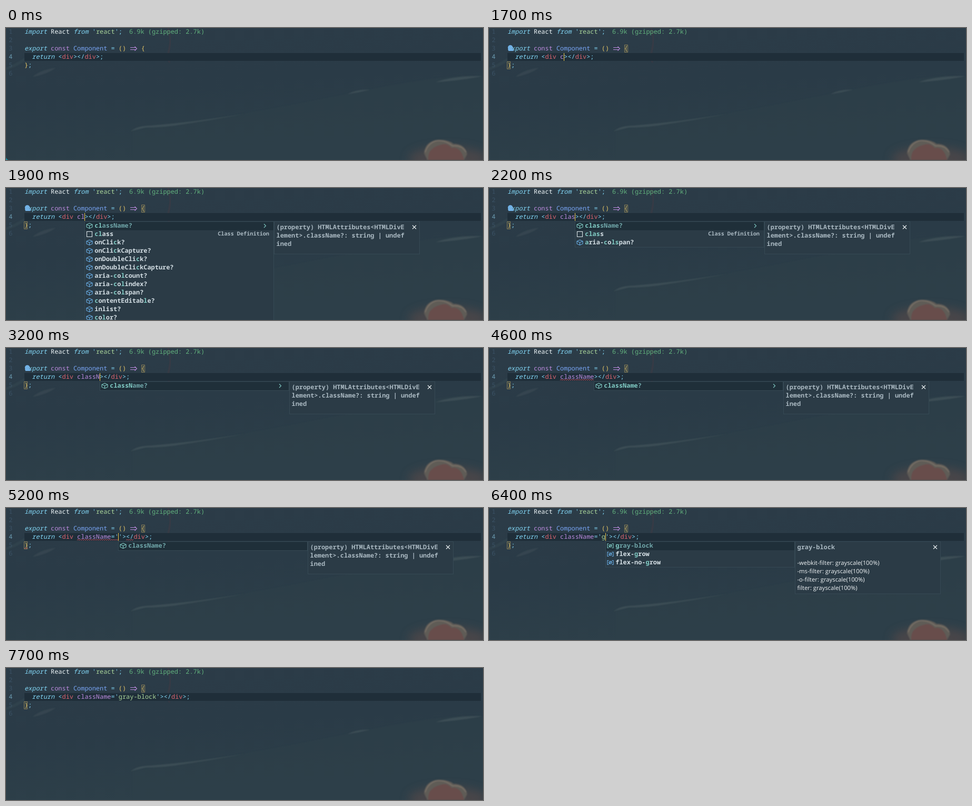
An HTML page that plays this animation: 906 by 253 pixels, repeating every 8 s.

```html
<!DOCTYPE html>
<html lang="en">
<head>
<meta charset="utf-8">
<title>Editor completion</title>
<style>
  html, body { margin: 0; width: 100%; height: 100%; overflow: hidden; background: #2b3c47; }
  svg { display: block; width: 906px; height: 253px; }
  text { font: 11.935px "Noto Sans Mono", "DejaVu Sans Mono", monospace; white-space: pre; text-rendering: geometricPrecision; }
  .key { fill: #82d6f5; font-style: italic; }
  .op { fill: #82d6f5; }
  .id { fill: #eef6f8; }
  .str { fill: #a9d49a; }
  .cost { fill: #62b17d; }
  .attr { fill: #bd8ce0; }
  .fn { fill: #78a5f5; }
  .br { fill: #e6c766; }
  .tag { fill: #dc6570; }
  .num { fill: #3b5265; }
  .now { fill: #6c9cb2; }
  .row { fill: #d3dee4; font-weight: 600; }
  .sel { fill: #6fa5a8; }
  .hit { fill: #80cbc4; font-weight: 700; }
  .info { fill: #a9b8c1; font-weight: 600; }
  .prose { font: 11.25px "Open Sans", "Noto Sans", sans-serif; fill: #f0f4f6; }
  .line { fill: none; stroke-width: 1.1; }
  .panel { fill: #2b3b46; stroke: #364954; }
  .box { fill: none; stroke: #8d8257; }
  .wave { fill: none; stroke: #c4515c; stroke-width: .9; }
</style>
</head>
<body>
<svg viewBox="0 0 906 253">
  <defs>
    <linearGradient id="sky" x1="0" y1="0" x2=".25" y2="1">
      <stop offset="0" stop-color="#2c3c48"/>
      <stop offset=".5" stop-color="#2a3b47"/>
      <stop offset="1" stop-color="#2d3f49"/>
    </linearGradient>
    <filter id="soft" x="-20%" y="-50%" width="140%" height="200%"><feGaussianBlur stdDeviation="1"/></filter>
    <filter id="haze" x="-40%" y="-60%" width="180%" height="220%"><feGaussianBlur stdDeviation="9"/></filter>
  </defs>
  <rect width="906" height="253" fill="url(#sky)"/>
  <path d="M240 197Q450 168 650 126T906 93V253H240Z" fill="#2f414a" opacity=".6" filter="url(#soft)"/>
  <g fill="#43535a" opacity=".75" filter="url(#soft)">
    <path d="M236 198Q250 187 275 187Q360 180 455 164Q400 175 340 184Q300 191 265 191Z"/>
    <path d="M648 127Q665 117 692 118Q670 124 648 127Z"/>
    <path d="M815 104Q850 91 906 92Q870 100 815 104Z"/>
    <path d="M50 94Q65 80 95 76Q80 88 50 94Z" opacity=".6"/>
    <path d="M0 76Q30 64 60 38Q45 66 0 81Z" opacity=".4"/>
  </g>
  <path d="M308 0Q315 22 310 40T311 66" fill="none" stroke="#4b3a43" stroke-width="2" opacity=".7" filter="url(#soft)"/>
  <ellipse cx="840" cy="250" rx="75" ry="22" fill="#54494a" opacity=".7" filter="url(#haze)"/>
  <g filter="url(#soft)">
    <path d="M794 240Q796 220 815 215Q838 212 850 222Q872 222 876 242L870 253H800Z" fill="#5f5b57"/>
    <path d="M802 253Q800 232 822 225Q838 218 846 230Q864 226 870 253Z" fill="#684e4c"/>
    <path d="M796 238Q802 220 818 216Q834 214 848 226Q866 224 874 238" fill="none" stroke="#787066" stroke-width="2"/>
  </g>
  <rect x="35" y="48" width="867" height="15" fill="#1f2e39"/>
  <g id="code"></g>
  <g id="live"></g>
</svg>
<script>
const LOOP = 8000, LEFT = 34.95, CELL = 7.161, TOP = 65, ROW = 16;
const colX = n => LEFT + CELL * n;
const cursorX = n => Math.floor(colX(n));
const esc = s => s.replace(/&/g, '&amp;').replace(/</g, '&lt;');
const span = (cls, s) => `<tspan class="${cls}">${esc(s)}</tspan>`;
const text = (x, y, body, cls = '') => `<text x="${x}" y="${y}" class="${cls}">${body}</text>`;
const codeLine = (n, ...parts) =>
  text(LEFT, ROW * n - 5, parts.map(([cls, s]) => span(cls, s)).join(''));

// Completion lists: [kind, label, query override]
const PROP = ['prop', 'className?'], SNIP = ['snip', 'class'];
const props = s => s.split(' ').map(label => ['prop', label]);
const enums = s => s.split(' ').map(label => ['enum', label]);
const lists = {
  many: [PROP, SNIP, ...props('onClick? onClickCapture? onDoubleClick? onDoubleClickCapture? aria-colcount? aria-colindex? aria-colspan? contentEditable? inlist? color?')],
  few: [PROP, SNIP, ['prop', 'aria-colspan?', 'acls']],
  exact: [SNIP, PROP],
  one: [PROP],
  classes: enums('absolute block bg-white border container fixed flex flex-grow flex-no-grow gray-block hidden inline'),
  grey: enums('gray-block flex-grow flex-no-grow')
};
const details = {
  prop: { h: 62, head: ['(property) HTMLAttributes<HTMLDivE', 'lement>.className?: string | undef', 'ined'] },
  snip: { h: 132, head: ['Class Definition', '', 'class name {', '  constructor(parameters) {', '', '  }', '}'] },
  pos: { h: 52, head: ['absolute'], prose: ['position: absolute'] },
  filter: { h: 100, head: ['gray-block'],
    prose: ['-webkit-filter', '-ms-filter', '-o-filter', 'filter'].map(p => p + ': grayscale(100%)') }
};

// Each step overrides part of the state before it
const steps = [
  [0, { attr: '', cursor: 0, match: 0, corner: 1, bulb: 0, list: '', detail: '', wave: 0 }],
  [800, { cursor: 1, match: 1 }],
  [900, { corner: 0 }],
  [1200, { attr: ' ' }],
  [1400, { bulb: 1 }],
  [1600, { attr: ' c' }],
  [1800, { attr: ' cl', list: 'many' }],
  [1900, { detail: 'prop' }],
  [2000, { attr: ' cla' }],
  [2200, { attr: ' clas', list: 'few' }],
  [2300, { attr: ' class' }],
  [2400, { list: 'exact' }],
  [2500, { detail: 'snip' }],
  [2900, { cursor: 0 }],
  [3200, { attr: ' classN', cursor: 1, list: 'one', detail: 'prop' }],
  [3500, { attr: ' classNa' }],
  [3600, { bulb: 0, wave: 1 }],
  [3900, { attr: ' classNam' }],
  [4100, { attr: ' className' }],
  [4600, { cursor: 0 }],
  [4800, { attr: " className=''", cursor: 1 }],
  [5200, { wave: 2 }],
  [5300, { list: '', detail: '', cursor: 0 }],
  [5400, { list: 'classes', detail: 'pos' }],
  [5700, { wave: 0 }],
  [5800, { cursor: 1 }],
  [6100, { cursor: 0 }],
  [6400, { attr: " className='g'", cursor: 1, list: 'grey', detail: 'filter' }],
  [6900, { cursor: 0 }],
  [7200, { attr: " className='gray-block'", cursor: 1, list: '', detail: '' }],
  [7700, { cursor: 0 }]
];

function icon(kind, x, y, color) {
  const d = {
    prop: 'M0-5L5.5-2.5V2.5L0 5L-5.5 2.5V-2.5ZM-5.5-2.5L0 0L5.5-2.5M0 0V5',
    snip: 'M-5-5H5V5H-5Z',
    enum: 'M-3-4H-5.5V4H-3M3-4H5.5V4H3M-2.5 2.5L2.5-2.5M-2.5 0A2.5 2.5 0 1 0 2.5 0A2.5 2.5 0 1 0-2.5 0'
  }[kind];
  return `<path class="line" stroke="${color}" transform="translate(${x} ${y})" d="${d}"/>`;
}

function marked(label, query) {
  let i = 0;
  return [...label].map(ch => ch === query[i] ? (i++, span('hit', ch)) : esc(ch)).join('');
}

function drawList(items, x, query) {
  let out = `<rect class="panel" x="${x + .5}" y="${TOP - .5}" width="359" height="${items.length * ROW + 1}"/>`;
  items.forEach(([kind, label, own], i) => {
    const y = TOP + ROW * i, first = i === 0;
    if (first) out += `<rect x="${x + 1}" y="${y}" width="358" height="${ROW}" fill="#1f2f39"/>`;
    const color = kind === 'snip' ? '#dde6ea' : first ? '#80cbc4' : '#69aee6';
    out += icon(kind, x + 9.5, y + 7.5, color);
    out += text(x + 19.3, y + 11, marked(label, own || query), first ? 'row sel' : 'row');
    if (kind === 'snip' && !first)
      out += `<text x="${x + 351}" y="${y + 10}" text-anchor="end" class="info" style="font-size:10.2px">Class Definition</text>`;
    if (first && kind !== 'enum' && !query.includes('='))
      out += `<path class="line" stroke="#80cbc4" d="M${x + 341} ${y + 4}l3.5 3.5l-3.5 3.5"/>`;
  });
  return out;
}

function drawDetail({ h, head, prose = [] }, x) {
  const cx = x + 266.5, cy = 75;
  return `<rect class="panel" x="${x + .5}" y="${TOP - .5}" width="276" height="${h}"/>`
    + head.map((s, i) => text(x + 4.5, 79 + ROW * i, esc(s), 'info')).join('')
    + prose.map((s, i) => text(x + 4.5, 109 + ROW * i, esc(s), 'prose')).join('')
    + `<path class="line" stroke="#eef3f5" d="M${cx - 3.5} ${cy - 3.5}l7 7m0-7l-7 7"/>`;
}

function squiggle(from, to, y) {
  let d = `M${from} ${y}`;
  for (let x = from, up = 1; x < to; x += 2, up = -up) d += `l2 ${-2 * up}`;
  return `<path class="wave" d="${d}"/>`;
}

function draw(s) {
  const [, name, eq, value] = s.attr.match(/^([^=]*)(=?)(.*)$/);
  const body = value.slice(1, -1), quote = value ? "'" : '';
  const col = 13 + s.attr.length - (value ? 1 : 0), x = cursorX(col);
  let out = codeLine(4, ['key', '  return '], ['op', '<'], ['tag', 'div'], ['attr', name],
    ['op', eq + quote], ['str', body], ['op', quote + '></'], ['tag', 'div'], ['op', '>;']);
  if (s.match) out += '<path class="box" d="M257.5 32.5h6v14h-6zM34.5 64.5h6v14h-6z"/>';
  if (s.corner) out += '<path d="M0 248Q1 252 5 253H0Z" fill="#1696a8"/>';
  if (s.bulb) out += '<circle cx="40.5" cy="37.5" r="4.7" fill="#72b2e6"/><path d="M36 40h6v4h-5zM42 40h4.500v4h-4.500z" fill="#72b2e6"/>';
  if (s.wave) out += squiggle(135, s.wave > 1 ? 213 : x, 62);
  if (s.wave > 1) out += squiggle(228, 241, 62) + squiggle(35, 41, 78);
  if (s.list) out += drawList(lists[s.list], x, value ? body || '=' : name.trim());
  if (s.detail) out += drawDetail(details[s.detail], x + 360);
  if (s.cursor) out += `<rect x="${x}" y="48" width="1" height="15" fill="#f2c84b"/>`;
  return out;
}

document.getElementById('code').innerHTML =
  [1, 2, 3, 4, 5, 6].map(n => text(5.3, ROW * n - 5, n, n === 4 ? 'now' : 'num')).join('')
  + codeLine(1, ['key', 'import '], ['id', 'React '], ['key', 'from '], ['op', "'"], ['str', 'react'], ['op', "';"])
  + text(234, 11, '6.9k (gzipped: 2.7k)', 'cost')
  + codeLine(3, ['key', 'export '], ['attr', 'const '], ['fn', 'Component '], ['op', '= '], ['br', '()    {'])
  + '<path class="line" stroke="#bd8ce0" d="M236 37.500h10.500M236 41.500h10.500M244.500 35.500l4 4l-4 4"/>'
  + codeLine(5, ['br', '}'], ['op', ';']);

const live = document.getElementById('live');
let shown = -1;
function tick() {
  const t = performance.now() % LOOP;
  const at = steps.filter(([start]) => start <= t).length;
  if (at !== shown) {
    shown = at;
    live.innerHTML = draw(Object.assign({}, ...steps.slice(0, at).map(([, change]) => change)));
  }
  requestAnimationFrame(tick);
}
tick();
</script>
</body>
</html>
```
